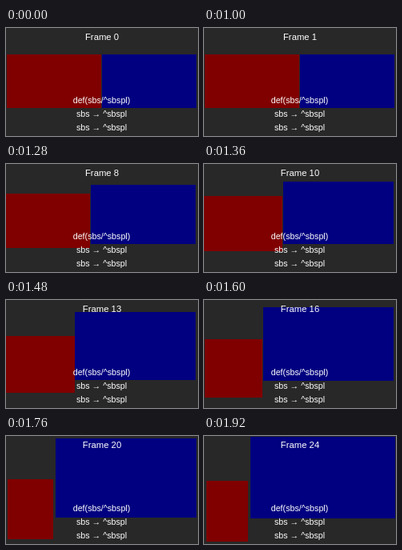
These frames come from a looping animation (240 px wide and 135 px high, 2920 ms). An HTML page:

```html
<!DOCTYPE html>
<html lang="en">
<head>
<meta charset="utf-8">
<title>Side-by-side transition</title>
<style>
  html, body { margin: 0; height: 100%; overflow: hidden; background: #282828; }
  svg { display: block; width: 100%; height: 100%; }
  text { font: 10.7px "Liberation Sans", Arial, sans-serif; fill: #fff; text-anchor: middle; }
  .title { font-size: 11.3px; }
</style>
</head>
<body>
<svg viewBox="0 0 240 135">
  <rect id="red" fill="#800000"/>
  <rect id="blue" fill="#000080"/>
  <text id="title" class="title" x="120" y="15"></text>
  <text x="119.5" y="94">def(sbs/^sbspl)</text>
  <text x="119.5" y="111">sbs → ^sbspl</text>
  <text x="119.5" y="128">sbs → ^sbspl</text>
</svg>
<script>
const LOOP = 2920, HOLD = 1000, STEP = 40, LAST = 24, STAGE_WIDTH = 240;

// Boxes hold x, y, width, height; crop is cut from both sides in stage units.
const red = { from: [1, 33, 117, 66], to: [-38, 56, 134, 75], crop: 74 };
const blue = { from: [120, 33, 117, 66], to: [58, 1, 180, 101], crop: 0 };

const byId = id => document.getElementById(id);
const mix = (a, b, s) => a + (b - a) * s;
const smooth = t => (1 - Math.cos(Math.PI * t)) / 2;

function place(id, { from, to, crop }, s) {
  const [x, y, w, h] = from.map((v, i) => mix(v, to[i], s));
  const cut = crop * s * w / STAGE_WIDTH;
  const left = Math.floor(x + cut), top = Math.floor(y);
  const right = Math.floor(x + Math.floor(w) - cut) + 1;
  const bottom = Math.floor(y + Math.floor(h)) + 1;
  const box = { x: left, y: top, width: right - left, height: bottom - top };
  for (const name in box) byId(id).setAttribute(name, box[name]);
}

function draw(now) {
  const time = now % LOOP;
  const step = time < HOLD ? 0 : Math.min(LAST, Math.floor((time - HOLD) / STEP) + 1);
  const s = smooth(Math.max(0, step - 1) / (LAST - 1));
  place("red", red, s);
  place("blue", blue, s);
  byId("title").textContent = "Frame " + step;
}

const start = performance.now();
function tick() {
  draw(performance.now() - start);
  requestAnimationFrame(tick);
}
tick();
</script>
</body>
</html>
```
